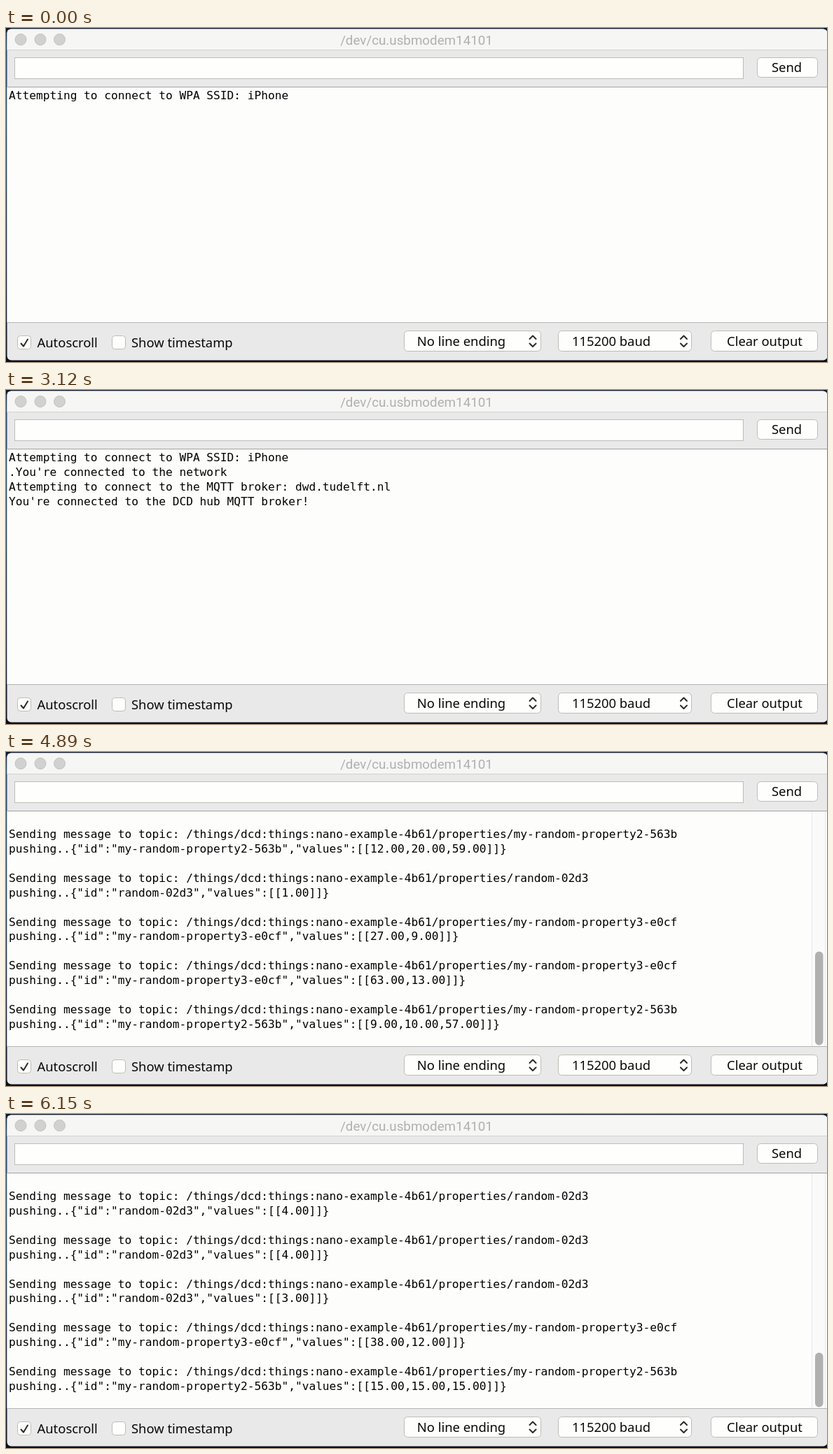
An HTML page that plays this animation: 1172x478 px, repeating every 6180 ms.

```html
<!DOCTYPE html>
<html lang="en">
<head>
<meta charset="utf-8">
<title>Serial monitor</title>
<style>
  html, body { margin: 0; width: 100%; height: 100%; overflow: hidden; background: #0d111c; }
  svg { display: block; width: 1172px; height: 478px; }
  text { font: 500 18.4px "Noto Sans", "Open Sans", sans-serif; fill: #080808; }
  .mid { text-anchor: middle; }
  .title { font: 18.8px Roboto, "Liberation Sans", sans-serif; fill: #b0b0b0; text-anchor: middle; }
  #log text { font: 16.18px "DejaVu Sans Mono", "Liberation Mono", monospace; fill: #000; }
  .light { fill: #d1d1d1; stroke: #c2c2c2; }
  .btn { fill: #fefefd; stroke: #bcbdb6; }
  .mark { fill: none; stroke: #2b2b2b; stroke-width: 2; stroke-linecap: round; stroke-linejoin: round; }
</style>
</head>
<body>
<svg viewBox="0 0 1172 478">
  <defs>
    <linearGradient id="desk" x2="0" y2="1">
      <stop offset="0" stop-color="#0f1726"/>
      <stop offset=".05" stop-color="#27466c"/>
      <stop offset=".3" stop-color="#27466c"/>
      <stop offset="1" stop-color="#0b0f1a"/>
    </linearGradient>
  </defs>
  <rect width="1172" height="478" fill="url(#desk)"/>
  <rect x="1.5" y="1.5" width="1171" height="474" rx="6" fill="#e9e9e9"/>
  <path d="M1.5 31V7.5q0-6 6-6H1166q6 0 6 6V31z" fill="#f6f6f5"/>
  <path d="M1.5 31.5H1172" stroke="#d2d2d2"/>
  <circle class="light" cx="21" cy="16.5" r="8"/>
  <circle class="light" cx="49" cy="16.5" r="8"/>
  <circle class="light" cx="76.5" cy="16.5" r="8"/>
  <text class="title" x="586" y="23.5">/dev/cu.usbmodem14101</text>

  <rect x="12.5" y="42.5" width="1040" height="30" fill="#fefefd" stroke="#bcbcb8"/>
  <rect class="btn" x="1072.5" y="42.5" width="86" height="28" rx="5"/>
  <text class="mid" x="1114.5" y="63">Send</text>

  <rect x="1.5" y="84" width="1171" height="337" fill="#fdfdfc"/>
  <path d="M1.5 84.5H1172" stroke="#a2a2a2"/>
  <path d="M1.5 421.5H1172" stroke="#b4b4b4"/>
  <g id="log"></g>
  <g id="bar">
    <rect x="1150" y="85" width="20" height="336" fill="#fafafa"/>
    <path d="M1150.5 85V421M1169.5 85V421" stroke="#e8e8e8"/>
    <rect id="thumb" x="1155" width="11.5" rx="5.7" fill="#b0b0b0"/>
  </g>

  <rect class="btn" x="16.5" y="440.5" width="19" height="19" rx="4"/>
  <path class="mark" d="M21.5 451.5l3.5 4 6-10"/>
  <text x="44.5" y="457">Autoscroll</text>
  <rect class="btn" x="151.5" y="440.5" width="19" height="19" rx="4"/>
  <text x="179" y="457">Show timestamp</text>

  <rect class="btn" x="568.5" y="433.5" width="195" height="29" rx="5"/>
  <text class="mid" x="650" y="454.5">No line ending</text>
  <path class="mark" d="M747.5 445l4.5-4.5 4.5 4.5M747.5 451.5l4.5 4.5 4.5-4.5"/>
  <rect class="btn" x="788.5" y="433.5" width="190" height="29" rx="5"/>
  <text class="mid" x="864" y="454.5">115200 baud</text>
  <path class="mark" d="M963 445l4.5-4.5 4.5 4.5M963 451.5l4.5 4.5 4.5-4.5"/>
  <rect class="btn" x="1006.5" y="433.5" width="152" height="29" rx="5"/>
  <text class="mid" x="1083" y="454.5">Clear output</text>
</svg>
<script>
const LOOP = 6180, ROWS = 16, LINE = 20.93;
const FIRST_PUSH = 3345, PUSH_EVERY = 143;

const ids = { 1: "random-02d3", 2: "my-random-property3-e0cf", 3: "my-random-property2-563b" };

// The number of values in a reading tells which property it belongs to.
const readings = [
  [45, 11], [31, 18, 52], [2], [24, 14], [79, 21], [62, 17], [12, 20, 59],
  [1], [27, 9], [63, 13], [9, 10, 57], [3], [1], [40, 7], [76, 12, 44],
  [4], [4], [3], [38, 12], [15, 15, 15]
];

function push(values) {
  const id = ids[values.length];
  const list = values.map(v => v.toFixed(2)).join(",");
  return [
    "",
    `Sending message to topic: /things/dcd:things:nano-example-4b61/properties/${id}`,
    `pushing..{"id":"${id}","values":[[${list}]]}`
  ];
}

function output(t) {
  const lines = ["Attempting to connect to WPA SSID: iPhone"];
  if (t >= 1300) lines.push(".");
  if (t >= 2460) {
    lines[1] += "You're connected to the network";
    lines.push("Attempting to connect to the MQTT broker: dwd.tudelft.nl");
  }
  if (t >= 2820) lines.push("You're connected to the DCD hub MQTT broker!", "");
  const count = Math.max(0, Math.floor((t - FIRST_PUSH) / PUSH_EVERY) + 1);
  readings.slice(0, count).forEach(r => lines.push(...push(r)));
  return [...lines, ""];
}

const get = id => document.getElementById(id);
const log = get("log"), bar = get("bar"), thumb = get("thumb");
const rows = Array.from({ length: ROWS }, (_, i) => {
  const row = document.createElementNS(log.namespaceURI, "text");
  row.setAttribute("x", 4);
  row.setAttribute("y", 102 + i * LINE);
  return log.appendChild(row);
});

function draw(t) {
  const lines = output(t), total = lines.length;
  const top = Math.max(0, total - ROWS);
  rows.forEach((row, i) => {
    const text = lines[top + i] || "";
    if (row.textContent !== text) row.textContent = text;
  });
  bar.style.display = top ? "" : "none";
  const height = 334 * ROWS / total - 3;
  thumb.setAttribute("y", 419.5 - height);
  thumb.setAttribute("height", height);
}

function tick() {
  draw(performance.now() % LOOP);
  requestAnimationFrame(tick);
}
tick();
</script>
</body>
</html>
```
